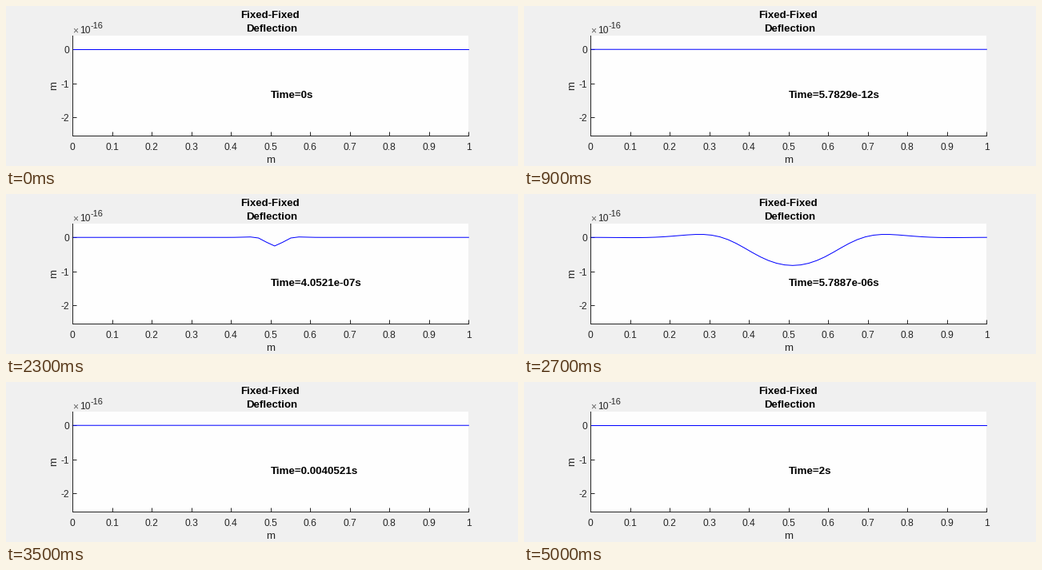
A matplotlib script that plays this animation: 640 by 200 pixels, repeating every 5.1 s.

```python
import numpy as np
import matplotlib.pyplot as plt
from matplotlib.animation import FuncAnimation

W, H, DPI = 640, 200, 100
PT = 72 / DPI                      # points per pixel
LEFT, RIGHT, TOP, BOTTOM = 83.2, 578.3, 37.2, 162.2
Y_LOW, Y_HIGH = -2.535, 0.4        # in units of 1e-16 m
INK = "#262626"

NODES = 50
STIFFNESS = 9.05e5                 # EI / (rho A)
KICK = -4e4                        # acceleration of the struck node at t = 0
FIRST_STEP = 1.7366e-14
KAPPA = 0.185                      # first-order NDF coefficient


def time_steps():
    """Steps grow tenfold after every third one, up to 0.2 s, and end at 2 s."""
    steps = [FIRST_STEP * 10.0 ** (i // 3) for i in range(42)] + [0.2] * 7
    return steps + [2 - sum(steps)]


def beam_operator():
    """Fourth-difference matrix of a beam clamped at both ends."""
    n = NODES - 2
    k = 6 * np.eye(n)
    for offset, value in ((1, -4), (2, 1)):
        k += value * (np.eye(n, k=offset) + np.eye(n, k=-offset))
    k[0, 0] = k[-1, -1] = 7
    return STIFFNESS * (NODES - 1) ** 4 * k


def simulate(steps):
    """Integrate the struck beam implicitly; one row of deflections per step."""
    k = beam_operator()
    n = len(k)
    q, v = np.zeros(n), np.zeros(n)
    dq, dv = np.zeros(n), np.zeros(n)
    dv[n // 2] = KICK * steps[0]
    theta = KAPPA / (1 + KAPPA)
    rows, last = [np.zeros(NODES)], steps[0]
    for h in steps:
        g = h / (1 + KAPPA)
        a = q + theta * dq * h / last
        b = v + theta * dv * h / last
        q_new = np.linalg.solve(np.eye(n) + g * g * k, a + g * b)
        v_new = (q_new - a) / g
        dq, dv = q_new - q, v_new - v
        q, v, last = q_new, v_new, h
        rows.append(np.pad(q, 1))
    return np.array(rows)


steps = time_steps()
times = np.concatenate([[0], np.cumsum(steps)])
shapes = simulate(steps)
shapes *= Y_LOW / shapes.min()

plt.rcParams["font.family"] = "Liberation Sans"
fig = plt.figure(figsize=(W / DPI, H / DPI), dpi=DPI, facecolor="#f0f0f0")


def label(x, y, text, size=12, **style):
    """Text with its baseline at pixel (x, y), measured from the top left."""
    style = {"color": INK, "ha": "center", "va": "baseline", **style}
    return fig.text(x / W, 1 - y / H, text, fontsize=size * PT, **style)


ax = fig.add_axes([LEFT / W, 1 - BOTTOM / H,
                   (RIGHT - LEFT) / W, (BOTTOM - TOP) / H],
                  facecolor="#fefefe")
ax.set(xlim=(0, 1), ylim=(Y_LOW, Y_HIGH),
       xticks=np.arange(11) / 10, yticks=[-2, -1, 0])
ax.tick_params(direction="in", length=5 * PT, width=PT, color=INK,
               labelbottom=False, labelleft=False)
for side in ("top", "right"):
    ax.spines[side].set_visible(False)
for side in ("left", "bottom"):
    ax.spines[side].set(linewidth=PT, color=INK)

for i in range(11):
    label(LEFT + (RIGHT - LEFT) * i / 10, 180.3, f"{i / 10:g}")
for value in (0, -1, -2):
    y = TOP + (BOTTOM - TOP) * (Y_HIGH - value) / (Y_HIGH - Y_LOW)
    label(78.9, y + 4.9, f"{value}", ha="right")

label(83.3, 34.3, "×", ha="left", color="#606060")
label(92.2, 34.3, "10", ha="left")
label(106, 28.2, "-16", 11, ha="left")
label(331, 196.3, "m", 13.2)
label(66, 99.3, "m", 13.2, rotation=90, ha="right", va="center")
label(330.4, 15.2, "Fixed-Fixed", 13.2, color="black", weight="bold")
label(332.3, 32.2, "Deflection", 13.2, color="black", weight="bold")
clock = label(331, 115, "", 13.33, color="black", weight="bold", ha="left")

curve, = ax.plot(np.linspace(0, 1, NODES), shapes[0], color="blue",
                 linewidth=PT, clip_on=False)


def update(i):
    curve.set_ydata(shapes[i])
    clock.set_text(f"Time={times[i]:.5g}s")
    return curve, clock


anim = FuncAnimation(fig, update, frames=len(times), interval=100,
                     repeat=True, repeat_delay=0)
plt.show()
```
